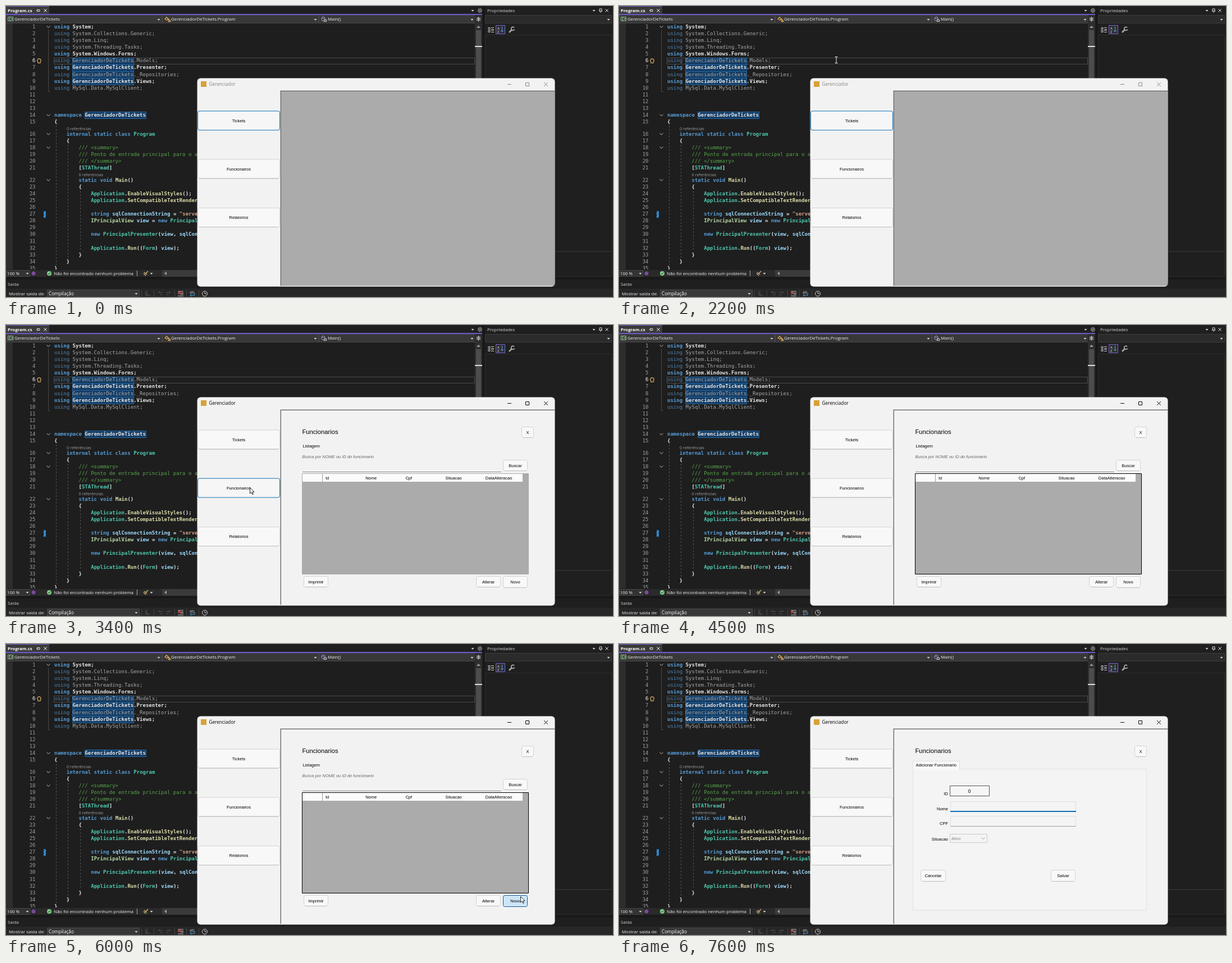
These frames come from a looping animation (1081x518 px, 8 s). An HTML page with a canvas:

```html
<!DOCTYPE html>
<html lang="pt">
<head>
<meta charset="utf-8">
<title>Gerenciador</title>
<style>
html, body { margin: 0; width: 100%; height: 100%; overflow: hidden; background: #1e1e1e; }
canvas { display: block; }
</style>
</head>
<body>
<canvas id="stage" width="1081" height="518"></canvas>
<script>
const ctx = document.getElementById('stage').getContext('2d');
const LOOP = 8000, TICK = 100;
const UI = '500 7.9px "Open Sans", sans-serif';
const UI_BOLD = 'bold 7.85px "Open Sans", sans-serif';
const TITLE = '8.2px "Open Sans", sans-serif';
const LENS = '7.3px "Open Sans", sans-serif';
const FORM = '7.5px "Liberation Sans", sans-serif';
const MONO = '9.03px "DejaVu Sans Mono", monospace';
const COL = 5.435;
const FACE = '#f2f2f2', BLUE = '#0f6fb4', GRID = '#ababab', ACCENT = '#6a59c8';

function text(s, x, y, color = '#f0f0f0', font = UI, align = 'left') {
  ctx.font = font;
  ctx.textAlign = align;
  ctx.fillStyle = color;
  ctx.fillText(s, x, y + 2.8);
}
function rect(x, y, w, h, color) {
  ctx.fillStyle = color;
  ctx.fillRect(x, y, w, h);
}
function box(x, y, w, h, fill, stroke, r = 0) {
  ctx.beginPath();
  ctx.roundRect(x + .5, y + .5, w - 1, h - 1, r);
  if (fill) { ctx.fillStyle = fill; ctx.fill(); }
  if (stroke) { ctx.strokeStyle = stroke; ctx.lineWidth = 1; ctx.stroke(); }
}
function line(d, color, width = 1) {
  ctx.strokeStyle = color;
  ctx.lineWidth = width;
  ctx.stroke(new Path2D(d));
}
function shape(d, color) {
  ctx.fillStyle = color;
  ctx.fill(new Path2D(d));
}
function dot(x, y, r, color) {
  ctx.beginPath();
  ctx.arc(x, y, r, 0, 7);
  ctx.fillStyle = color;
  ctx.fill();
}
const arrowDown = (x, y, color = '#d0d0d0') => shape(`M${x - 2.5} ${y - 1}h5l-2.5 3z`, color);
const cross = (x, y, r, color) => line(`M${x - r} ${y - r}l${2 * r} ${2 * r}m0 ${-2 * r}l${-2 * r} ${2 * r}`, color);
const pin = (x, y, color) => line(`M${x - 2} ${y - 3}h4v4h1h-6h1zM${x} ${y + 1}v3`, color);

// Each run starts with its colour key; upper-case keys are dimmed code.
const INK = {
  k: '#569cd6', w: '#e4e4e4', t: '#4ec9b0', i: '#b8d7a3', m: '#dcdcaa', v: '#9cdcfe', s: '#d69d85',
  c: '#57a64a', K: '#4f82ad', W: '#a8a8a8'
};
const CODE = {
  1: 'kusing |wSystem;',
  2: 'Kusing |WSystem.Collections.Generic;',
  3: 'Kusing |WSystem.Linq;',
  4: 'Kusing |WSystem.Threading.Tasks;',
  5: 'kusing |wSystem.Windows.Forms;',
  6: 'Kusing |WGerenciadorDeTickets.Models;',
  7: 'kusing |wGerenciadorDeTickets.Presenter;',
  8: 'Kusing |WGerenciadorDeTickets._Repositories;',
  9: 'kusing |wGerenciadorDeTickets.Views;',
  10: 'Kusing |WMySql.Data.MySqlClient;',
  14: 'knamespace |wGerenciadorDeTickets',
  15: 'w{',
  16: 'k    internal static class |tProgram',
  17: 'w    {',
  18: 'c        /// <summary>',
  19: 'c        /// Ponto de entrada principal para o aplicativo.',
  20: 'c        /// </summary>',
  21: 'w        [|tSTAThread|w]',
  22: 'k        static void |mMain|w()',
  23: 'w        {',
  24: 't            Application|w.|mEnableVisualStyles|w();',
  25: 't            Application|w.|mSetCompatibleTextRenderingDefault|w(|kfalse|w);',
  27: 'k            string |vsqlConnectionString |w= |s"server',
  28: 'i            IPrincipalView |vview |w= |knew |tPrincipalView|w();',
  30: 'k            new |tPrincipalPresenter|w(|vview|w, |vsqlConnectionString|w);',
  32: 't            Application|w.|mRun|w((|tForm|w) |vview|w);',
  33: 'w        }',
  34: 'w    }',
  35: 'w}'
};
const lineY = n => 37 + 12.1 * (n - 1) + (n > 15 ? 9.3 : 0) + (n > 21 ? 9.4 : 0);

function drawCode() {
  ctx.save();
  ctx.beginPath();
  ctx.rect(0, 31, 835, 438);
  ctx.clip();
  rect(0, 31, 12, 438, '#2d2d2d');
  box(85, 92, 750, 12, null, '#4a4a4a');
  for (const n of [6, 7, 8, 9, 14]) {
    box(n == 14 ? 140 : 118, Math.round(lineY(n)) - 6, 110, 13, '#143d66', '#2766a0');
  }
  ctx.setLineDash([3, 3]);
  line('M89.5 213V461M110.5 247V449M132.5 329V437', '#555');
  ctx.setLineDash([]);
  line('M75.5 42V152.5H79', '#4a4a4a');
  for (let n = 1; n <= 35; n++) {
    const y = lineY(n);
    text(n, 52.5, y, n == 6 ? '#fff' : '#a0a0a0', MONO, 'right');
    let col = 0;
    for (const run of (CODE[n] || '').split('|')) {
      if (!run) continue;
      const key = run[0], s = run.slice(1);
      const weight = 'kwtimvs'.includes(key) ? 'bold ' : '';
      const indent = s.length - s.trimStart().length;
      text(s.trimStart(), 86 + COL * (col + indent), y, INK[key], weight + MONO);
      col += s.length;
    }
  }
  for (const n of [1, 14, 16, 18, 22]) {
    const y = lineY(n);
    rect(72, y - 4, 7, 8, '#1e1e1e');
    line(`M72.5 ${y - 1.5}l3 3l3-3`, '#c8c8c8');
  }
  text('0 referências', 108, 218, '#a0a0a0', LENS);
  text('0 referências', 129.5, 300, '#a0a0a0', LENS);
  line('M57 99.5a3.2 3.2 0 1 1 4 0v2h-4z', '#e0b95c', 1.2);
  rect(67, 365, 4, 12, '#1b78c2');
  line('M67 376l4-4M67 371l4-4', '#7cc0f0');
  ctx.restore();
}

function drawEditor() {
  rect(0, 0, 1081, 518, '#1f1f1f');
  rect(0, 31, 835, 439, '#1e1e1e');
  rect(0, 0, 77, 14, '#3a3a3a');
  rect(0, 0, 77, 1, ACCENT);
  rect(0, 14, 848, 2, ACCENT);
  text('Program.cs', 3, 8, '#fff', UI_BOLD);
  line('M54 8h2m0-2.5v5m0-4h4v3h-4', '#ddd');
  cross(70, 8, 2.7, '#eee');
  arrowDown(831, 8);
  ctx.setLineDash([1.2, 1.1]);
  line('M841 8a3 3 0 1 1 6 0a3 3 0 1 1-6 0', '#ccc', 2);
  ctx.setLineDash([]);
  dot(844, 8, 1, '#ccc');

  rect(0, 16, 848, 15, '#333');
  ['GerenciadorDeTickets', 'GerenciadorDeTickets.Program', 'Main()'].forEach((label, i) => {
    const x = i * 279;
    box(x - 1, 16, 279, 15, '#383838', '#464646');
    text(label, x + 15, 23.5);
    arrowDown(x + 272, 24);
  });
  box(3, 19, 10, 8, null, '#8fb88f');
  line('M8 21h-2v4h2M9 22h3m-3 2h3', '#8fd08f');
  line('M283 23l3-3 3 3-3 2zm4 1l4 0m-2 3l2-2 2 2-2 1z', '#dba95a', 1.3);
  line('M562 21l3-2 3 2v4l-3 2-3-2zl3 1.5 3-1.5', '#a98ed6');
  box(566, 24, 5, 4, '#383838', '#ddd');

  rect(835, 16, 13, 454, '#2e2e2e');
  line('M838 23.5h7M841.5 19v9M838 21.5h7m0 4h-7', '#ccc');
  shape('M838 39h7l-3.5-4z', '#999');
  rect(837, 43, 9, 88, '#4d4d4d');
  rect(835, 71, 13, 2, '#e0e0e0');

  drawCode();

  rect(0, 470, 848, 12, '#2a2a2a');
  box(0, 470, 43, 12, '#333', '#444');
  text('100 %', 2, 476);
  arrowDown(38, 476);
  dot(49, 476, 3.5, '#7a4a9c');
  dot(77, 476, 4, '#7fd08a');
  line('M75 476l1.5 1.7 2.8-3.4', '#1e1e1e');
  text('Não foi encontrado nenhum problema', 85, 476);
  rect(233, 471, 1, 10, '#aaa');
  line('M253 472l-4 4m-3-2l5 4m-6-2l4 4', '#cfb47a', 1.4);
  arrowDown(259, 476);
  rect(278, 470, 557, 12, '#3a3a3a');
  shape('M286 472.5v7l-4-3.5z', '#999');
}

function drawPanels() {
  rect(848, 0, 5, 487, '#191919');
  text('Propriedades', 857, 8, '#d8d8d8');
  arrowDown(1047, 8);
  pin(1059, 8, '#ddd');
  cross(1070, 8, 2.7, '#ddd');
  box(853, 16, 226, 15, '#2b2b2b', '#3d3d3d');
  arrowDown(1073, 24);
  line('M859 38.5h3v3h-3zm0 5h3v3h-3zM864 38.5h5m-5 3h5m-5 2h5m-5 3h5', '#c4c4c4');
  box(872, 34, 17, 16, '#303030', '#7462d6');
  text('A', 875, 39, '#eee', '6px "Open Sans", sans-serif');
  text('Z', 875, 45, '#eee', '6px "Open Sans", sans-serif');
  line('M883.5 37v9m-2.5-2.5l2.5 2.5 2.5-2.5', '#4aa3e8');
  line('M896 47l5-5', '#aaa', 2.5);
  line('M905 38.5a3 3 0 1 0 .5 3', '#aaa', 1.8);
  box(853, 51, 226, 386, null, '#2d2d2d');
  box(853, 437, 226, 45, null, '#2d2d2d');

  rect(0, 482, 1081, 5, '#191919');
  text('Saída', 3, 495, '#d0d0d0');
  rect(0, 503, 1081, 15, '#272727');
  text('Mostrar saída de:', 5, 512);
  box(73, 505, 165, 15, '#383838', '#4a4a4a');
  text('Compilação', 76, 512, '#fff', TITLE);
  arrowDown(232, 512);
  for (const x of [241, 263, 300, 321, 343]) rect(x, 506, 1, 11, '#444');
  line('M248 508h5m-5 7h9m-9-3h4v3m-3-6v5', '#555');
  line('M279 510h-8l3-2m5 6h-5M285 510h8l-3-2m-5 6h5', '#555');
  line('M307 508h9m-5 3h5m-5 2h5m-10 3h10', '#bbb');
  line('M306 508l5 5m0-5l-5 5', '#e0534f', 1.4);
  text('ab', 327, 509, '#ccc', '7px "Open Sans", sans-serif');
  line('M328 515h8v-4m-6 2l-2 2 2 2', '#4aa3e8');
  line('M349.5 512a4.5 4.5 0 1 1 9 0a4.5 4.5 0 1 1-9 0M354 509v3h3', '#ccc');
}

const BUTTON = {
  normal: ['#f8f8f8', '#d2d2d2'],
  focus: ['#f6f6f6', BLUE],
  hover: ['#e2eff9', BLUE],
  pressed: ['#cde6f7', '#155a94']
};
function button(label, x, y, w, h, state = 'normal') {
  const [fill, stroke] = BUTTON[state];
  box(x, y, w, h, fill, stroke, 3);
  if (state == 'normal') rect(x + 3, y + h - 1, w - 6, 1, '#bcbcbc');
  text(label, x + w / 2, y + h / 2, '#000', FORM, 'center');
}
const label = (s, x, y, align) => text(s, x, y, '#000', FORM, align);

function drawList(t) {
  label('Listagem', 528.5, 215);
  text('Busca por NOME ou ID do funcionario', 527.5, 234, '#666', 'italic ' + FORM);
  rect(528, 261, 354, 1, '#8a8a8a');
  button('Buscar', 885, 240, 44, 20);
  box(527, 264, 404, 180, GRID, t < 3500 ? GRID : '#000');
  rect(528, 265, 392, 14, '#fbfbfb');
  rect(563, 265, 1, 14, '#999');
  ['Id', 'Nome', 'Cpf', 'Situacao', 'DataAlteracao'].forEach((s, i) => label(s, 569 + 71.2 * i, 272.5));
  button('Imprimir', 530, 447, 44, 20);
  button('Alterar', 837, 447, 44, 20);
  button('Novo', 885, 447, 44, 21, t < 5500 ? 'normal' : t < 6000 ? 'hover' : 'pressed');
}

function field(name, y, active) {
  label(name, 586, y + 13.5, 'right');
  box(590, y, 224, 19, '#f4f4f4', '#dedede');
  rect(590, y + 17 + !active, 224, 1 + active, active ? BLUE : '#a0a0a0');
}
function drawAdd(t) {
  box(523, 222, 417, 252, '#f4f4f4', '#e2e2e2');
  box(523, 208, 84, 16, '#f9f9f9', '#dedede');
  rect(524, 222, 82, 2, '#f9f9f9');
  label('Adicionar Funcionario', 528.5, 215.5);
  label('ID', 586, 266.5, 'right');
  box(589, 252, 71, 19, '#f6f6f6', '#555');
  text('0', 624, 262, '#000', '8.5px "Liberation Sans", sans-serif', 'center');
  field('Nome', 280, t >= 7000);
  field('CPF', 306, false);
  label('Situacao', 586, 347.5, 'right');
  box(589, 338, 67, 16, '#f4f4f4', '#cacaca');
  text('Ativo', 592, 346, '#858585', FORM);
  line('M645.5 344.5l3 3 3-3', '#999');
  button('Cancelar', 537, 402, 45, 21);
  button('Salvar', 769, 402, 44, 21);
  if (t >= 7000 && t < 7600) rect(592, 282, 1, 10, '#000');
}

function drawWindow(t) {
  const active = t >= 3200, opened = t >= 3400;
  const ink = active ? '#000' : '#868686';
  ctx.save();
  box(340, 128, 638, 372, FACE, null, 6);
  ctx.clip();
  rect(347, 134, 10, 10, '#d8a13a');
  text('Gerenciador', 361.5, 139.5, ink, TITLE);
  line('M893 139.5h7', ink);
  box(925, 136, 7, 7, null, ink, .5);
  cross(961.5, 139.5, 3.3, ink);
  // Sunken client edge.
  rect(488, 150, 489, 348, '#bdbdbd');
  rect(489, 151, 488, 347, '#696969');
  rect(490, 152, 487, 346, opened ? FACE : GRID);

  const funcState = t < 2500 || t >= 3500 ? 'normal' : t < 3200 ? 'hover' : t < 3400 ? 'pressed' : 'focus';
  button('Tickets', 341, 186.5, 147, 35, active ? 'normal' : 'focus');
  button('Funcionairos', 341, 272.5, 147, 35, funcState);
  button('Relatorios', 341, 359, 147, 35);

  if (opened) {
    text('Funcionarios', 527.5, 191, '#000', '11.2px "Liberation Sans", sans-serif');
    button('X', 918, 181, 22, 20);
    t < 6200 ? drawList(t) : drawAdd(t);
  }
  ctx.restore();
}

// The pointer shows only while it moves or clicks: [start, stop, hide, from, to].
const TOP = [400, 2], EDITOR = [387, 96], FUNC = [434, 289], REST = [767, 304], NOVO = [916, 449], NOME = [655, 299];
const MOVES = [
  [600, 900, 1000, TOP, EDITOR],
  [2200, 2500, 2600, EDITOR, FUNC],
  [3000, 3100, 3500, FUNC, FUNC],
  [3900, 4400, 4500, FUNC, REST],
  [4800, 5500, 5600, REST, NOVO],
  [6000, 6100, 6300, NOVO, NOVO],
  [6300, 6700, 6800, NOVO, NOME],
  [7000, 7100, 7100, NOME, NOME]
];
function drawPointer(t) {
  const move = MOVES.find(m => t >= m[0] && t < m[2]);
  if (!move) return;
  const [start, stop, , from, to] = move;
  const p = Math.min(1, (t - start) / (stop - start)), ease = p * p * (3 - 2 * p);
  const [x, y] = from.map((a, i) => a + (to[i] - a) * ease);
  if (y > 31 && y < 128) {
    line(`M${x - 2.5} ${y - 5.5}h5m-2.5 0v11m-2.5 0h5`, '#eee');
    return;
  }
  const arrow = `M${x + .5} ${y + .5}v10.5l2.5-2.3 1.8 4 1.7-.8-1.8-3.7h3.3z`;
  shape(arrow, '#fff');
  line(arrow, '#111', .9);
}

let shown = -1;
function frame(now) {
  const t = Math.floor(now % LOOP / TICK) * TICK;
  if (t != shown) {
    shown = t;
    drawEditor();
    drawPanels();
    drawWindow(t);
    drawPointer(t);
  }
  requestAnimationFrame(frame);
}
requestAnimationFrame(frame);
</script>
</body>
</html>
```
